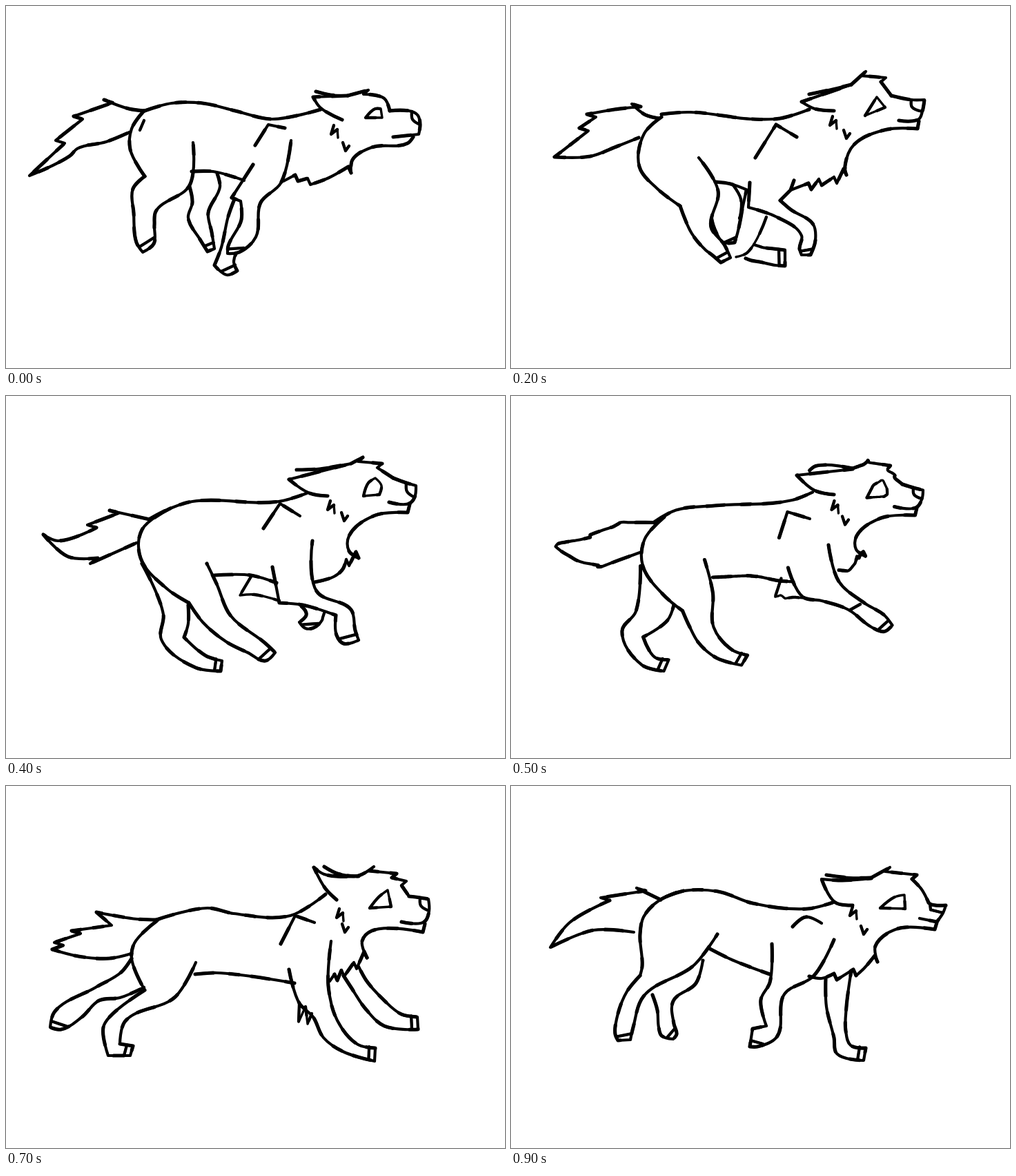
Write an HTML page that moves like this. It is 723 px wide and 525 px high and loops after 1 s.

```html
<!DOCTYPE html>
<html lang="en">
<head>
<meta charset="utf-8">
<title>Running dog</title>
<style>
  html, body { margin: 0; width: 100%; height: 100%; overflow: hidden; background: #fff; }
  svg { display: block; width: 100%; height: 100%; }
  path { fill: none; stroke: #000; stroke-linecap: round; stroke-linejoin: round; }
</style>
</head>
<body>
<svg id="stage" viewBox="0 0 723 525"></svg>
<script>
// Key points of each pose. "*" grows a tuft of fur, "/" starts a new stroke.
// A leg ends with heel, sole, toe, instep and three points back up.
const poses = [
  {
    farHind: "266,262 270,285 264,307 282,340 292,356 302,352 298,328 293,300 310,262 306,243",
    farFore: "331,280 322,305 312,350 302,376 320,390 335,384 330,370 350,330 350,315 350,300",
    nearHind: "201,247 184,265 185,300 189,343 198,357 214,345 215,318 217,298 266,260 271,198",
    nearFore: "358,230 327,278 340,283 341,310 322,348 321,359 338,357 362,335 369,285 398,257 413,195",
    rump: "200,152 182,178 180,208 201,247",
    tail: "200,152 178,149 142,136* 98,160* 72,195* 34,246 93,217 103,207 145,197 179,183",
    back: "198,153 240,141 285,141 332,152 385,164 456,150",
    belly: "269,240 300,240 345,253",
    ear: "487,165 455,147 445,132 495,130/449,124 470,129 495,130",
    brow: "495,130 525,122* 548,134 556,152",
    muzzle: "556,152 588,153 597,159 600,172 598,186 561,190",
    jaw: "590,190 582,199 530,205 502,223 500,242",
    chest: "500,242* 468,249 441,259* 423,254* 402,254",
    eye: "521,162 535,149 543,149 545,162 521,162",
    shoulder: "361,202 380,172 404,177",
    cheek: "475,173 488,198",
    extra: "200,166 194,180"
  },
  {
    farHind: "290,305 293,318 298,330 306,342 315,344 324,343 328,330 332,312 336,290 341,268",
    farFore: "340,366 348,369 360,371 383,376 397,377 397,354 380,352 364,350 358,348 352,346",
    nearHind: "245,290 262,330 282,354 290,360 304,372 318,365 309,346 290,321 300,268 272,220",
    nearFore: "346,256 344,292 385,306 421,333 418,352 421,361 434,361 441,340 438,317 405,295 390,282",
    rump: "218,161 193,185 186,233 212,265 245,290",
    tail: "215,163 195,158 175,142* 150,150 110,157* 99,177* 63,219 115,218 155,203 185,191",
    back: "218,157 260,154 350,164 390,163 432,150",
    belly: "296,255 318,258 345,268",
    ear: "468,152 440,149 421,139 493,114/432,128 460,122 493,114",
    brow: "493,114 514,95* 543,104* 551,130",
    muzzle: "551,130 580,136 599,136 596,153 591,164 562,166",
    jaw: "591,167 589,178 545,179 497,201 484,232 486,245",
    chest: "486,245* 472,257* 450,260* 435,266* 405,267 410,253/405,267 390,282",
    eye: "513,159 530,132 542,147 513,159",
    shoulder: "354,220 384,172 414,190",
    cheek: "466,160 482,180",
    extra: "370,306 342,358 326,364/322,260 333,280 331,308"
  },
  {
    farHind: "197,243 228,317 225,353 275,394 311,399 313,384 290,377 258,350 264,330 264,303",
    farFore: "428,305 434,312 435,318 425,328 434,337 446,336 458,325 459,321 460,318 461,315",
    nearHind: "265,300 285,328 320,357 350,372 376,384 390,372 375,358 325,318 305,272 291,243",
    nearFore: "386,248 396,300 430,303 478,318 479,347 489,359 511,354 506,340 500,310 450,283 444,210",
    rump: "238,163 197,194 195,235 235,281 265,300",
    tail: "208,179 150,166* 118,187* 75,210 54,201 90,233 133,235 122,243 189,213",
    back: "207,179 238,163 270,153 395,153 436,141",
    belly: "302,260 355,260 392,271",
    ear: "466,145 440,141 410,121 500,98/421,107 450,106 500,98",
    brow: "500,98 517,89* 545,98* 561,119",
    muzzle: "561,119 580,126 594,130 592,147 584,156 555,154",
    jaw: "585,157 582,169 535,173 497,203 497,225 511,235",
    chest: "511,235* 497,246* 488,251 475,262 447,270",
    eye: "518,145 525,126 535,119 544,130 541,143 518,145",
    shoulder: "373,192 397,156 426,174",
    cheek: "470,152 486,169",
    extra: "355,262 339,289 360,288 396,297"
  },
  {
    farHind: "178,250 133,310 97,328 104,386 132,399 144,381 127,381 125,349 190,320 208,303",
    farFore: "535,287 540,287 545,288 550,288 562,289 563,280 556,271 530,270 518,269 508,267",
    nearHind: "232,323 232,340 223,358 246,388 292,397 295,380 265,378 262,352 280,300 270,232",
    nearFore: "417,250 450,283 470,291 500,302 565,323 593,324 594,311 575,295 525,291 500,255 476,222",
    rump: "206,188 190,222 187,258 208,297 232,323",
    tail: "206,188 150,203 95,220 57,219 80,240 132,256 120,258 187,240",
    back: "206,188 240,168 320,165 420,149 438,138",
    belly: "283,266 345,261 400,270 427,268",
    ear: "470,141 440,133 418,109 490,114/444,109 433,97 490,112",
    brow: "490,112 510,107 525,91* 556,104* 567,119* 573,137",
    muzzle: "573,137 586,140 600,143 599,151 591,167 556,167",
    jaw: "591,168 589,177 540,180 505,202 503,220 516,229",
    chest: "516,229* 507,244*",
    eye: "513,150 525,132 542,124 548,148 513,150",
    shoulder: "404,219 404,180 440,182",
    cheek: "467,152 474,180",
    extra: "428,267 426,294* 434,299 445,292 465,290"
  },
  {
    farHind: "182,250 167,270 130,292 70,328 64,350 80,353 110,335 135,311 165,307 200,292",
    farFore: "489,275 500,292 520,322 548,348 597,353 596,335 573,331 545,308 522,282 511,262",
    nearHind: "201,296 150,335 141,350 148,391 180,391 184,377 165,374 172,342 245,306 275,256",
    nearFore: "410,266 425,315 445,335 460,365 488,385 534,399 535,380 510,375 480,340 467,290 471,225",
    rump: "218,196 186,228 182,250 201,296",
    tail: "220,194 190,193 131,183 153,202 95,210* 70,227* 67,237 105,247 150,250 182,243",
    back: "218,194 292,177 330,185 412,188 463,157",
    belly: "274,273 305,271 418,286",
    ear: "479,165 463,149 446,118 461,128 511,131/461,117 480,127 511,131",
    brow: "495,130 511,130 533,117* 566,127* 580,138* 584,160",
    muzzle: "584,160 600,162 612,164 613,181 606,197 573,197",
    jaw: "607,200 604,212 530,210 516,225 523,249",
    chest: "523,249* 508,265* 490,276* 480,282* 469,283",
    eye: "527,177 540,161 553,151 558,175 527,177",
    shoulder: "398,229 419,188 447,198",
    cheek: "483,178 487,200",
    extra: "425,315 424,342 434,320 437,345 443,330"
  },
  {
    farHind: "170,232 168,245 143,266 152,335 160,351 174,350 174,335 171,312 170,300 168,285",
    farFore: "481,287 488,325 512,365 517,385 575,395 578,375 560,374 538,355 525,320 512,265",
    nearHind: "165,274 140,293 100,329 94,337 92,354 112,354 130,343 168,306 230,292 283,241",
    nearFore: "382,265 384,322 367,355 374,383 380,399 413,401 416,378 395,374 403,335 443,287 463,223",
    rump: "238,162 197,190 182,240 165,274",
    tail: "216,174 180,175 140,168 165,180 98,196 126,195 62,232 110,229 185,226",
    back: "238,158 290,156 380,177 474,170",
    belly: "275,257 300,264 382,285",
    ear: "491,179 475,160 457,130 528,141/473,133 474,120 508,138",
    brow: "528,141 556,127* 592,137* 602,152* 598,174",
    muzzle: "598,174 614,178 628,178 626,190 617,208 587,206",
    jaw: "614,210 615,220 555,221 515,245 510,270",
    chest: "510,270* 496,275* 480,287* 467,286* 443,283",
    eye: "543,184 572,162 575,185 543,184",
    shoulder: "383,223 415,190 437,200"
  },
  {
    farHind: "205,303 212,325 214,350 218,362 235,367 240,360 236,345 235,312 268,286 278,253",
    farFore: "456,279 457,320 468,365 472,388 511,398 514,380 492,376 485,355 486,320 493,268",
    nearHind: "187,275 168,298 155,330 151,360 155,369 173,368 177,350 192,305 265,260 299,215",
    nearFore: "378,229 375,285 362,310 370,348 350,352 346,378 357,378 385,364 396,302 438,276 468,223",
    rump: "250,152 216,165 192,190 187,215 190,262 187,275",
    tail: "217,165 182,148* 130,162* 85,198 57,234 120,209 178,212",
    back: "216,165 245,153 300,153 350,170 430,178 466,169",
    belly: "288,236 320,252 375,273",
    ear: "495,173 470,169 450,135 480,137 522,134/457,129 490,133 522,133",
    brow: "522,133 549,118* 588,129* 595,150 605,169",
    muzzle: "605,169 607,171 630,173 626,184 617,197 592,192",
    jaw: "617,198 614,208 560,207 528,232 531,255",
    chest: "531,255* 512,264 500,275* 472,281* 450,279 432,276",
    eye: "535,177 556,161 570,158 571,178 535,177",
    shoulder: "408,204 427,190 450,199",
    cheek: "495,175 507,203"
  }
];

// Pose position for each tenth of a second; halves lie between two poses.
const steps = [0, 0.5, 1, 1.5, 2, 2.5, 3, 4, 5, 6];
const legs = ["farHind", "farFore", "nearHind", "nearFore"];
const parts = [...Object.keys(poses[0]), "nose", "toes"];
const thin = ["eye", "nose", "cheek", "toes", "extra"];

// Step from the tip of a tuft back to the outline.
const hooks = { tail: [13, 4], brow: [-7, 6], chest: [-4, -9], extra: [8, -5] };

const add = (a, b) => [a[0] + b[0], a[1] + b[1]];
const sub = (a, b) => [a[0] - b[0], a[1] - b[1]];
const lerp = (a, b, t) => [a[0] + (b[0] - a[0]) * t, a[1] + (b[1] - a[1]) * t];
const dist = (a, b) => Math.hypot(...sub(a, b));
const unit = v => {
  const n = Math.hypot(...v) || 1;
  return [v[0] / n, v[1] / n];
};

function parse(text, hook) {
  return text.split("/").map(stroke => stroke.split(" ").flatMap(token => {
    const p = token.split(",").map(parseFloat);
    return token.endsWith("*") ? [p, add(p, hook)] : [p];
  }));
}

// Points spread evenly along a stroke.
function spread(pts, count) {
  const ends = [0];
  for (let i = 1; i < pts.length; i++) ends.push(ends[i - 1] + dist(pts[i - 1], pts[i]));
  const total = ends[ends.length - 1];
  return Array.from({ length: count }, (_, k) => {
    const d = total * k / (count - 1);
    let i = 1;
    while (i < pts.length - 1 && ends[i] < d) i++;
    return lerp(pts[i - 1], pts[i], (d - ends[i - 1]) / (ends[i] - ends[i - 1]));
  });
}

function blend(from, to, t) {
  const n = Math.min(from.length, to.length);
  return from.slice(0, n).map((a, i) => {
    let b = to[i];
    if (a.length !== b.length) [a, b] = [spread(a, 30), spread(b, 30)];
    return a.map((p, k) => lerp(p, b[k], t));
  });
}

// Smooth curve through the points that keeps sharp corners sharp.
function curve(pts) {
  const dirs = pts.map((p, i) => {
    if (!i || i === pts.length - 1) return [0, 0];
    const a = unit(sub(p, pts[i - 1])), b = unit(sub(pts[i + 1], p));
    return a[0] * b[0] + a[1] * b[1] < 0.4 ? [0, 0] : unit(add(a, b));
  });
  let d = "M" + pts[0];
  for (let i = 1; i < pts.length; i++) {
    const p = pts[i - 1], q = pts[i], h = dist(p, q) / 3;
    const c1 = add(p, dirs[i - 1].map(v => v * h));
    const c2 = sub(q, dirs[i].map(v => v * h));
    d += "C" + [...c1, ...c2, ...q].map(v => v.toFixed(1)).join(" ");
  }
  return d;
}

// Line across the paw, a little behind its tip.
function toeLine(leg) {
  const [heel, sole, toe, instep] = leg.slice(-7, -3);
  const behind = (a, b) => lerp(a, b, Math.min(0.6, 9 / dist(a, b)));
  return [behind(toe, instep), behind(sole, heel)];
}

function cheekFur([a, b]) {
  const zig = [[0, 0], [-4, 13], [5, 6], [6, 18]], vee = [[0, 0], [4, 12], [9, 5]];
  return [zig.map(p => add(a, p)), vee.map(p => add(b, p))];
}

function keyStrokes(pos, part) {
  const i = Math.floor(pos), t = pos - i;
  const read = pose => pose[part] ? parse(pose[part], hooks[part]) : [];
  return t ? blend(read(poses[i]), read(poses[i + 1]), t) : read(poses[i]);
}

function drawing(pos) {
  const dog = {};
  parts.forEach(part => dog[part] = keyStrokes(pos, part));
  const [, top, , under] = dog.muzzle[0];
  dog.nose = [[top, [top[0] + 1, (top[1] + under[1]) / 2 + 2], under]];
  dog.toes = legs.map(leg => toeLine(dog[leg][0]));
  dog.cheek = dog.cheek.flatMap(cheekFur);
  return parts.map(part => dog[part].map(curve).join(""));
}

const stage = document.getElementById("stage");

function addPath(width) {
  const path = document.createElementNS("http://www.w3.org/2000/svg", "path");
  path.setAttribute("stroke-width", width);
  return stage.appendChild(path);
}

// A plain line with firmer brush pressure along some stretches.
const lines = parts.map(part => {
  const width = thin.includes(part) ? 3.4 : 4.2;
  const line = addPath(width), press = addPath(width + 0.9);
  if (part.startsWith("near")) line.style.fill = "#fff";
  press.setAttribute("stroke-dasharray", "26 24 14 18");
  return [line, press];
});
const drawings = steps.map(drawing);

let shown = -1;
function draw(ms) {
  const step = Math.floor(ms % 1000 / 100);
  if (step === shown) return;
  shown = step;
  lines.forEach((pair, i) => pair.forEach(path => path.setAttribute("d", drawings[step][i])));
}

const start = performance.now();
function tick() {
  draw(performance.now() - start);
  requestAnimationFrame(tick);
}
tick();
</script>
</body>
</html>
```
